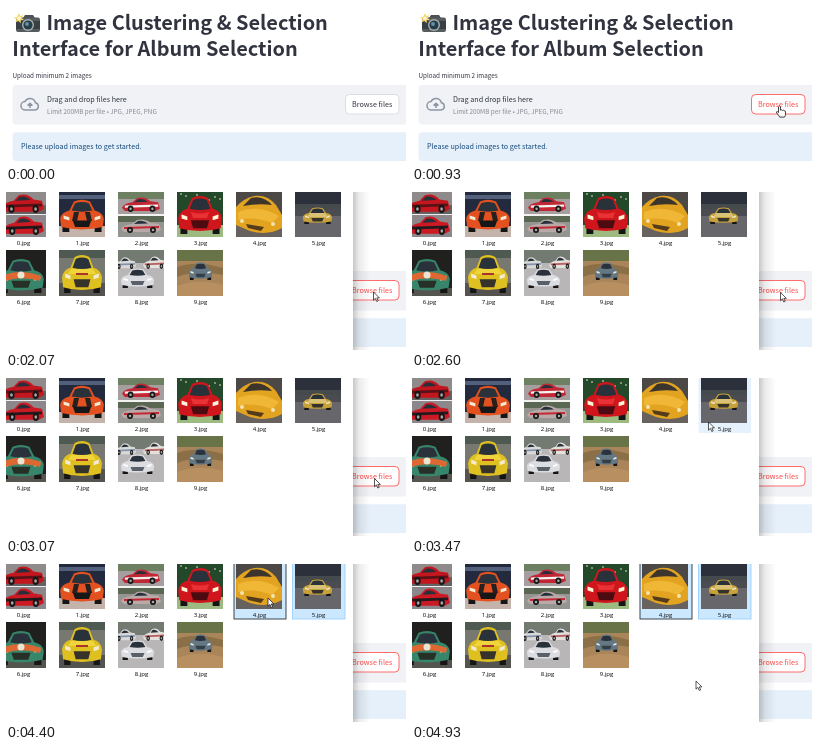
Animation of 400 by 158 pixels, one loop 5000 ms. Source, as an HTML page:

```html
<!DOCTYPE html>
<html lang="en">
<head>
<meta charset="utf-8">
<title>Album selection</title>
<style>
  html, body { margin: 0; width: 100%; height: 100%; overflow: hidden; background: #fff; }
  svg { display: block; width: 100vw; height: 100vh; }
  .ui { font-family: "Noto Sans CJK JP", "Noto Sans CJK SC", "Noto Sans CJK", Lato, sans-serif; font-size: 7.2px; fill: #31333f; }
  .title { font-size: 19.95px; font-weight: 700; }
  .small { font-size: 6.33px; }
  .name { font: 6px "Open Sans", "Noto Sans", sans-serif; text-anchor: middle; fill: #000; }
</style>
</head>
<body>
<svg viewBox="0 0 400 158" xmlns="http://www.w3.org/2000/svg">
  <defs>
    <linearGradient id="shade">
      <stop offset="0" stop-color="#000" stop-opacity=".22"/>
      <stop offset=".35" stop-color="#000" stop-opacity=".08"/>
      <stop offset="1" stop-color="#000" stop-opacity="0"/>
    </linearGradient>
    <clipPath id="thumb"><rect width="46" height="46"/></clipPath>
  </defs>
  <rect width="400" height="158" fill="#fff"/>

  <g class="ui">
    <g id="camera">
      <path d="M17 12l2-3h8l2 3z" fill="#4b5054"/>
      <rect x="10" y="11.5" width="24" height="14.5" rx="2" fill="#565b5e"/>
      <path d="M10 15h24v8H10z" fill="#394044"/>
      <circle cx="22" cy="19" r="6" fill="#a8b0b3"/>
      <circle cx="22" cy="19" r="4.6" fill="#263c49"/>
      <circle cx="21" cy="18" r="2" fill="#668da1"/>
      <path d="M13 7l1.2 3.1 3.2-.9-1.9 2.7 2.5 2-3.2.2-.2 3.2-2.2-2.4-2.9 1.4 1-3-2.7-1.6 3.3-.7z" fill="#f6d66b"/>
      <circle cx="13" cy="12.3" r="1.7" fill="#fff8d4"/>
    </g>
    <text class="title" x="40.5" y="23.7">Image Clustering &amp; Selection</text>
    <text class="title" x="6.3" y="50.2">Interface for Album Selection</text>
    <text class="small" x="6.5" y="72">Upload minimum 2 images</text>
    <rect x="6.5" y="79" width="400" height="39.5" rx="4" fill="#f0f2f6"/>
    <g fill="none" stroke="#8d95a5" stroke-width="1.5" stroke-linejoin="round">
      <path d="M19.5 104a4.2 4.2 0 0 1-.6-8.4a5.6 5.6 0 0 1 10.5 1.1a3.7 3.7 0 0 1-.4 7.3z"/>
      <path d="M24 102v-4.6m-2.4 2.2l2.4-2.4 2.4 2.4"/>
    </g>
    <text x="41" y="95.7">Drag and drop files here</text>
    <text class="small" x="41" y="107.6" style="fill:#858891">Limit 200MB per file • JPG, JPEG, PNG</text>
    <rect id="button" x="339.5" y="88.5" width="53.5" height="19.5" rx="4" fill="#fff" stroke="#d6d7dc" stroke-width=".8"/>
    <text id="buttonText" x="366.2" y="101" text-anchor="middle">Browse files</text>
    <rect x="6.5" y="126.3" width="400" height="28.7" rx="4" fill="#e6f0fa"/>
    <text x="15" y="143.4" style="fill:#174a7c">Please upload images to get started.</text>
  </g>

  <g id="dialog">
    <rect x="347" width="17" height="158" fill="url(#shade)"/>
    <rect width="347" height="158" fill="#fff"/>
    <rect id="tile4" x="228" y="-2" width="52" height="57" stroke-width=".9"/>
    <rect id="tile5" x="286.5" y="-2" width="52.5" height="57" stroke-width=".9"/>
    <g id="files"></g>
  </g>

  <g id="cursor" stroke-linejoin="round">
    <path id="arrow" d="M0 0v8.2l1.9-1.8 1.4 3.1 1.4-.7-1.4-2.9h2.6z" fill="#fff" stroke="#111" stroke-width=".7"/>
    <path id="hand" d="M-1 .8q1-1.6 2 0v3.4q1.2-.8 1.9.2 1.2-.6 1.8.4 1.3-.4 1.3.9v2.6q0 1.4-1 2.8H.3q-1-1.7-3.2-4.3-.6-1.2.6-1.3l1.3 1z" fill="#fff" stroke="#111" stroke-width=".8"/>
  </g>
</svg>
<script>
const $ = id => document.getElementById(id);
const box = (x, y, w, h, fill) => `<rect x="${x}" y="${y}" width="${w}" height="${h}" fill="${fill}"/>`;
const shape = (d, fill) => `<path d="${d}" fill="${fill}"/>`;
const dot = (x, y, r, fill) => `<circle cx="${x}" cy="${y}" r="${r}" fill="${fill}"/>`;
const scene = (sky, ground, horizon) => box(0, 0, 46, 46, sky) + box(0, horizon, 46, 46 - horizon, ground);

// Front view of a car on a 40 by 20 grid
function car(x, y, w, h, paint, trim = "#222", lamp = "#f3ead0") {
  return `<g transform="translate(${x} ${y}) scale(${w / 40} ${h / 20})">` +
    shape("M3 14h6v6H3zM31 14h6v6h-6z", "#151515") +
    shape("M1 12Q2 8 9 7L13 1.5Q20-.5 27 1.5L31 7Q38 8 39 12L38 17Q20 20 2 17Z", paint) +
    shape("M11 7L14 2.5Q20 1.2 26 2.5L29 7Q20 8.4 11 7Z", "#29313a") +
    shape("M12 13h16l-2 4H14z", trim) +
    shape("M4 10l5 1v2l-5-1zM36 10l-5 1v2l5-1z", lamp) + "</g>";
}

// Low side view on a 40 by 14 grid
function racer(x, y, w, h, paint, stripe = "#f4f0ee") {
  return `<g transform="translate(${x} ${y}) scale(${w / 40} ${h / 14})">` +
    shape("M0 10Q2 6 11 5L16 1Q24-1 30 4L38 5 40 11 35 13H3Z", paint) +
    shape("M13 5L17 2Q23 1 27 4.5Z", "#26303a") +
    shape("M3 8L38 7V9L3 10Z", stripe) +
    dot(9, 11, 3, "#171717") + dot(32, 11, 3, "#171717") +
    dot(9, 11, 1.3, "#a8a8a8") + dot(32, 11, 1.3, "#a8a8a8") + "</g>";
}

const sparkles = Array.from({ length: 9 }, (_, i) => dot(4 + i * 17 % 40, 3 + i * 7 % 11, .8, "#fff6cf")).join("");

const photos = [
  scene("#8f8b8b", "#656264", 14) + racer(2, 3, 42, 19, "#c3161e", "#5b1217") +
    box(0, 23, 46, 1, "#eee") + box(0, 24, 46, 22, "#8b878a") + racer(3, 25, 41, 19, "#cb1a23", "#25191d"),
  scene("#242a3d", "#c3b3aa", 35) + box(0, 4, 46, 4, "#53607c") + car(0, 8, 46, 33, "#e2511f", "#171719") +
    shape("M15 21h5l-2 9h-5zM26 21h5l2 9h-5z", "#26201f"),
  scene("#6d8062", "#a5a09f", 8) + racer(4, 6, 38, 15, "#c22735") +
    box(0, 23, 46, 2, "#f2f2f0") + box(0, 25, 46, 21, "#949590") + box(0, 25, 46, 6, "#596753") +
    racer(3, 28, 40, 14, "#b9a9a8", "#c62833"),
  scene("#23482a", "#9dbb80", 34) + sparkles + car(0, 4, 46, 39, "#d0161d", "#4c0b10", "#fff4d6") +
    shape("M14 21q9 3 18 0l-2 6H16z", "#e93236"),
  scene("#4b4846", "#68625e", 30) + shape("M0 16Q8 7 18 5Q31 3 40 14L46 24V37Q32 45 14 40L0 34Z", "#e2a321") +
    shape("M7 15L15 7Q27 4 36 14Q22 12 7 15Z", "#3b352e") + shape("M2 21Q22 13 43 25L36 32Q17 25 2 29Z", "#f0b737") +
    shape("M10 33l18 3-3 4-13-3z", "#543b1c") + dot(6, 30, 2, "#f3e3ae") + dot(37, 33, 2, "#f3e3ae"),
  scene("#2b303b", "#66666b", 25) + box(0, 13, 46, 5, "#454b4d") + box(0, 18, 46, 7, "#4b4c52") +
    car(7, 16, 31, 17, "#c6a13c", "#34322d") + shape("M15 22h15l3 4H12z", "#d9c276"),
  scene("#20211f", "#55554f", 38) + car(-3, 8, 48, 35, "#37856b", "#263027", "#f0dc96") +
    shape("M1 26Q20 18 41 26l-1 5Q21 25 2 32z", "#df6732") + dot(21, 25, 3.5, "#ece4d2"),
  scene("#77786f", "#55534f", 33) + box(0, 0, 46, 8, "#4e5a51") + car(2, 4, 42, 39, "#dfc021", "#35332a") +
    shape("M12 19h22l3 5H9z", "#efd53b") + box(17, 23, 12, 2, "#aa332b"),
  scene("#737a72", "#b9b6b7", 13) + racer(-4, 7, 22, 12, "#dad9d8", "#8293ad") +
    racer(25, 6, 23, 13, "#e4e1dc", "#b96163") + car(2, 18, 35, 20, "#dcdde1", "#596069", "#fff"),
  scene("#687347", "#a98559", 11) + shape("M0 17Q20 10 46 18V25Q20 19 0 27Z", "#8b7047") +
    shape("M0 36Q20 28 46 35V46H0Z", "#b88f60") + car(11, 12, 25, 18, "#647785", "#343f45")
];

$("files").innerHTML = photos.map((art, i) => {
  const row = Math.floor(i / 6), x = -6 + i % 6 * 59;
  return `<g transform="translate(${x} ${row ? 58 : -1})"><g clip-path="url(#thumb)">${art}</g></g>` +
    `<text class="name" x="${x + 23.5}" y="${row ? 112 : 53}">${i}.jpg</text>`;
}).join("");

const LOOP = 5000, FPS = 15, OPEN = 1865, PICK_FIRST = 3730, PICK_SECOND = 4395;
const route = [
  [0, 403, 126], [130, 403, 126], [470, 367.5, 100], [2060, 367.5, 100], [2600, 368.5, 100.5],
  [3130, 368.5, 100.5], [3440, 296.5, 44], [3500, 296.5, 44], [3700, 298.5, 39.5], [3980, 298.5, 39.5],
  [4230, 262, 34], [4460, 262, 34], [4860, 284, 117], [LOOP, 284, 117]
];
const tileStyles = {
  idle: ["none", "none"], hover: ["#e5f1fc", "none"],
  selected: ["#cce8ff", "#99d1ff"], focused: ["#cce8ff", "#26323c"]
};

function pointer(t) {
  const i = route.findIndex((p, n) => n && t <= p[0]);
  const [t0, x0, y0] = route[i - 1], [t1, x1, y1] = route[i];
  const u = (t - t0) / (t1 - t0), k = u * u * (3 - 2 * u);
  return [x0 + (x1 - x0) * k, y0 + (y1 - y0) * k];
}

function paintTile(id, state) {
  const [fill, stroke] = tileStyles[state];
  $(id).setAttribute("fill", fill);
  $(id).setAttribute("stroke", stroke);
}

const show = (id, on) => $(id).setAttribute("visibility", on ? "visible" : "hidden");

function draw(ms) {
  const t = Math.floor((ms + 5) * FPS / 1000) * 1000 / FPS % LOOP;
  const [x, y] = pointer(t);
  const open = t >= OPEN;
  const overButton = x < 393 && y < 108;
  const active = open || overButton;
  const over = (left, right) => open && x > left && x < right && y < 55;
  $("cursor").setAttribute("transform", `translate(${x} ${y})`);
  $("button").setAttribute("stroke", active ? "#ff4b4b" : "#d6d7dc");
  $("buttonText").style.fill = active ? "#ff4b4b" : "#31333f";
  show("dialog", open);
  show("hand", !open && overButton);
  show("arrow", open || !overButton);
  paintTile("tile5", t >= PICK_SECOND ? "selected" : t >= PICK_FIRST ? "focused" : over(286, 339) ? "hover" : "idle");
  paintTile("tile4", t >= PICK_SECOND ? "focused" : over(228, 280) ? "hover" : "idle");
}

const start = performance.now();
function tick() {
  draw((performance.now() - start) % LOOP);
  requestAnimationFrame(tick);
}
draw(0);
requestAnimationFrame(tick);
</script>
</body>
</html>
```
